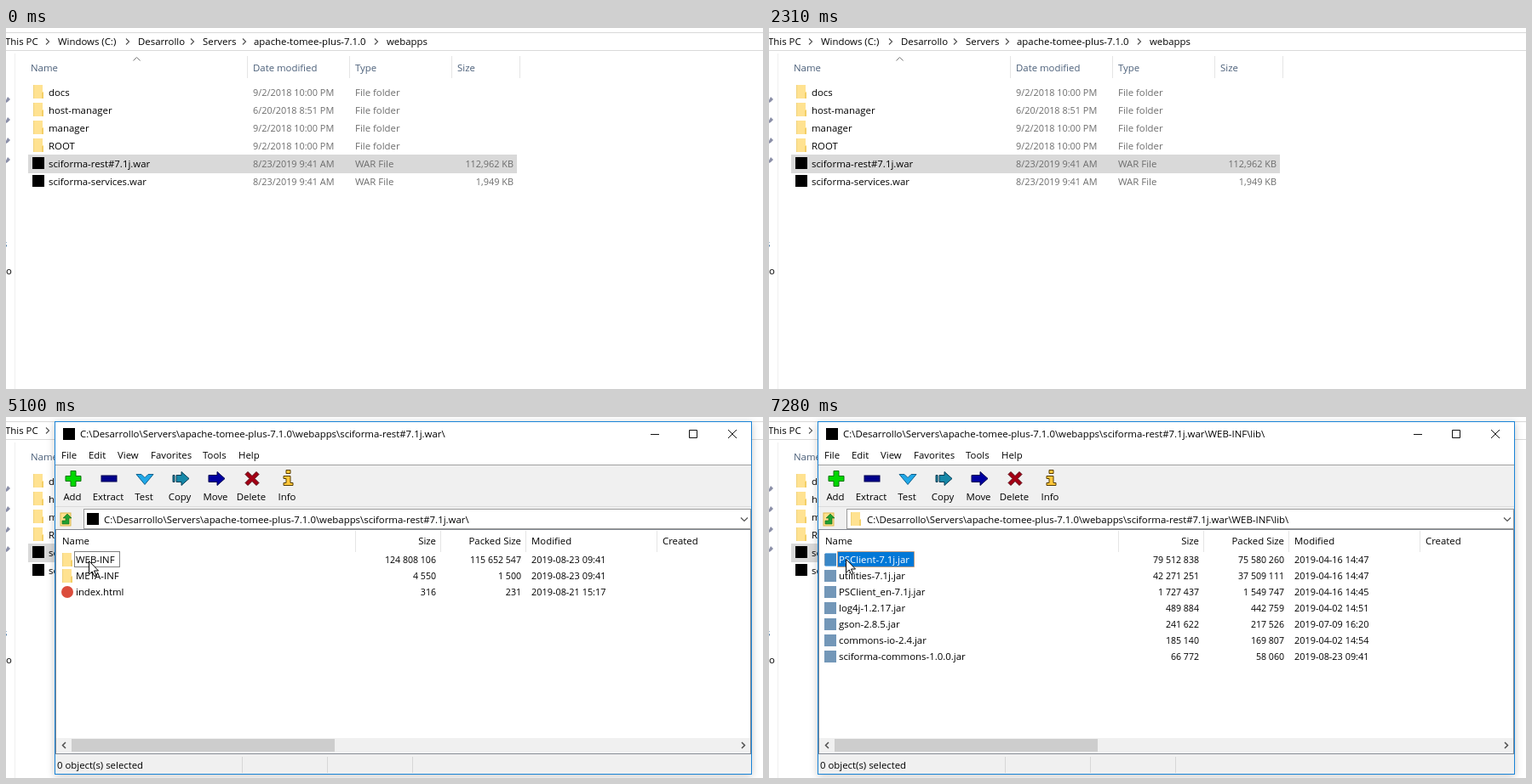
Recreate the animation shown at these times as an HTML page. Size 889 px wide and 425 px high, loop 7990 ms.

```html
<!DOCTYPE html>
<html lang="en">
<head>
<meta charset="utf-8">
<title>Browsing an archive</title>
<style>
  html, body { margin: 0; width: 100%; height: 100%; overflow: hidden; background: #fff; }
  svg { display: block; width: 889px; height: 425px; font: 11.4px "Open Sans", "Noto Sans", sans-serif; }
  text { white-space: pre; }
  .num { font-size: 10.9px; }
  .size { font-size: 10.6px; }
  #panel { filter: drop-shadow(0 2px 5px rgba(0, 0, 0, .22)); }
</style>
</head>
<body>
<svg id="stage" viewBox="0 0 889 425"></svg>
<script>
const LOOP = 7990;
const BLUE = '#0078d7';

// Drawing helpers, all returning SVG markup
const text = (x, y, s, fill = '#000', extra = '') => `<text x="${x}" y="${y}" fill="${fill}" ${extra}>${s}</text>`;
const right = (x, y, s, fill, cls = 'size') => text(x, y, s, fill, `text-anchor="end" class="${cls}"`);
const rect = (x, y, w, h, fill, extra = '') => `<rect x="${x}" y="${y}" width="${w}" height="${h}" fill="${fill}" ${extra}/>`;
const path = (d, fill, stroke = 'none', extra = '') => `<path d="${d}" fill="${fill}" stroke="${stroke}" ${extra}/>`;
const line = (d, stroke, width = 1) => path(d, 'none', stroke, `stroke-width="${width}"`);
const at = (x, y, body) => `<g transform="translate(${x} ${y})">${body}</g>`;

// Icons are centred on 0,0
const icons = {
  folder: path('M-6-8H5V0H6V8H-6Z', '#ffe291') + path('M4 1H6V8H4Z', '#f3cf68') + rect(-6, -8, 1, 16, '#f0d27c'),
  archive: rect(-7, -7, 14, 14, '#000'),
  browser: '<circle r="7" fill="#db4c3c"/>',
  xml: rect(-7, -7, 14, 14, '#d5d3a8'),
  jar: rect(-7, -7, 14, 14, '#7397b8'),
  page: path('M-5.5-7.5H2.5L5.5-4.5V7.5H-5.5Z M2.5-7.5V-4.5H5.5', '#fff', '#8a8a8a')
};
const icon = (name, x, y) => at(x, y, icons[name]);

const files = [
  ['docs', '9/2/2018 10:00 PM'], ['host-manager', '6/20/2018 8:51 PM'],
  ['manager', '9/2/2018 10:00 PM'], ['ROOT', '9/2/2018 10:00 PM'],
  ['sciforma-rest#7.1j.war', '8/23/2019 9:41 AM', '112,962 KB'],
  ['sciforma-services.war', '8/23/2019 9:41 AM', '1,949 KB']
];

function explorer() {
  const crumbs = [[-1, 'This PC', 47], [61, 'Windows (C:)', 141], [155, 'Desarrollo', 217],
    [231, 'Servers', 278], [291, 'apache-tomee-plus-7.1.0', 433], [447, 'webapps']];
  const columns = [[29, 'Name', 283], [290, 'Date modified', 403], [410, 'Type', 523], [530, 'Size', 603]];
  return line('M0 5.5H889M0 26.5H889', '#d9d9d9') + line('M10.5 30V425', '#f0f0f0') +
    crumbs.map(([x, s, next]) => text(x, 20, s) +
      (next ? line(`M${next} 12.5l3.5 3.5l-3.5 3.5`, '#555', 1.2) : '')).join('') +
    columns.map(([x, s, edge]) => text(x, 51, s, '#4c607a') + line(`M${edge + .5} 33V59`, '#e5e5e5')).join('') +
    line('M149.5 38.5l4-4l4 4', '#777') +
    [86, 110, 134, 157].map(y => path(`M0 ${y - 1}l2-4l3 3l-3 3l-2 1Z`, '#8b8fa8')).join('') +
    text(-4, 258, 's', '#31699c') + text(0, 290, 'o') +
    rect(26, 149, 574, 22, '#d9d9d9', 'id="selected"') + rect(26, 171, 574, 21, '#e5f3ff', 'id="hover"') +
    files.map(([name, date, size], i) => {
      const y = 76 + 21 * i;
      return icon(size ? 'archive' : 'folder', 38, y - 1) + text(50, y + 4, name) +
        text(290, y + 4, date, '#6d6d6d', 'class="num"') +
        text(410, y + 4, size ? 'WAR File' : 'File folder', '#6d6d6d') + right(596, y + 4, size || '', '#6d6d6d', 'num');
    }).join('');
}

const tools = [
  ['Add', path('M-3-9H3V-3H9V3H3V9H-3V3H-9V-3H-3Z', '#00d800', '#087508')],
  ['Extract', rect(-9, -3.5, 18, 7, '#00008c', 'stroke="#000050"')],
  ['Test', path('M-10-5H-4L0-1L4-5H10L0 7Z', '#20a8e8', '#12618c')],
  ['Copy', path('M-9-4H-7V4H-9ZM-5-4H1V-8L10 0L1 8V4H-5Z', '#1688a8', '#073d55')],
  ['Move', path('M-9-4H1V-8L10 0L1 8V4H-9Z', '#0000a0', '#000050')],
  ['Delete', path('M-8-5L-5-8L0-3L5-8L8-5L3 0L8 5L5 8L0 3L-5 8L-8 5L-3 0Z', '#a50014', '#50000a')],
  ['Info', path('M-2-10H3V-6H-2ZM-5-3H3V5H6V8H-5V5H-2V0H-5Z', '#ffc83c', '#553c00')]
];

function frame() {
  const menus = [[65, 'File'], [97, 'Edit'], [131, 'View'], [170, 'Favorites'], [231, 'Tools'], [273, 'Help']];
  const columns = [[66, 'Name', 410], [617, 'Modified', 764], [771, 'Created']];
  return rect(57.5, 5.5, 818, 415, '#fff', 'stroke="#1883d7"') +
    rect(58, 57, 817, 76, '#f0f0f0') + line('M58 56.5H875', '#a0a0a0') + line('M58 105.5H875', '#dcdcdc') +
    line('M757 20.5H767M802.5 15.5h9v9h-9ZM848 15l10 10m0-10l-10 10', '#111') +
    menus.map(([x, s]) => text(x, 49, s)).join('') +
    tools.map(([s, shape], i) => at(79 + 42 * i, 72.5, shape) +
      text(78 + 42 * i, 98, s, '#000', 'text-anchor="middle"')).join('') +
    rect(64, 113, 12, 15, '#ffe08c', 'stroke="#d9b84f"') +
    path('M66 126V122H70V119H67L72 114L77 119H74V126Z', '#20a030', '#0d6318', 'stroke-width=".6"') +
    rect(91.5, 108.5, 783, 23, '#fff', 'stroke="#9a9a9a"') + line('M863 118.5l4 4l4-4', '#555', 1.2) +
    columns.map(([x, s, edge]) => text(x, 150, s) + (edge ? line(`M${edge + .5} 134V159`, '#e5e5e5') : '')).join('') +
    right(505, 150, 'Size', '#000', '') + right(605, 150, 'Packed Size', '#000', '') +
    line('M510.5 134V159M610.5 134V159', '#e5e5e5') +
    rect(58, 378, 817, 17, '#f0f0f0') + rect(77, 379, 309, 15, '#cdcdcd') +
    line('M70 383l-3.5 3.5l3.5 3.5M864 383l3.5 3.5l-3.5 3.5', '#505050', 1.5) +
    rect(58.5, 132.5, 816, 264, 'none', 'stroke="#828790"') +
    rect(58, 397, 817, 23, '#f0f0f0') +
    line('M277.5 400V419M377.5 400V419M477.5 400V419', '#d7d7d7') + text(60, 414, '0 object(s) selected');
}

const ROOT = 'C:\\Desarrollo\\Servers\\apache-tomee-plus-7.1.0\\webapps\\sciforma-rest#7.1j.war\\';
const rootRows = [
  ['folder', 'WEB-INF', '124 808 106', '115 652 547', '2019-08-23 09:41'],
  ['folder', 'META-INF', '4 550', '1 500', '2019-08-23 09:41'],
  ['browser', 'index.html', '316', '231', '2019-08-21 15:17']
];
const views = [
  { start: 3790, path: ROOT, badge: 'archive', focus: 54, rows: rootRows },
  { start: 5420, path: ROOT, badge: 'archive', focus: 54, selected: true, rows: rootRows },
  { start: 5570, path: ROOT + 'WEB-INF\\', badge: 'folder', focus: 21, selected: true, rows: [
    ['folder', 'lib', '124 494 944', '115 527 270', '2019-08-23 09:41'],
    ['folder', 'classes', '310 496', '124 225', '2019-08-23 09:41'],
    ['xml', 'web.xml', '2 107', '704', '2019-08-21 10:22'],
    ['xml', 'beans.xml', '292', '168', '2019-08-01 08:20'],
    ['xml', 'scan.xml', '193', '115', '2019-08-22 08:17'],
    ['page', 'exclusions.list', '74', '65', '2019-08-22 08:17']
  ] },
  { start: 7130, path: ROOT + 'WEB-INF\\lib\\', badge: 'folder', focus: 91, selected: true, rows: [
    ['jar', 'PSClient-7.1j.jar', '79 512 838', '75 580 260', '2019-04-16 14:47'],
    ['jar', 'utilities-7.1j.jar', '42 271 251', '37 509 111', '2019-04-16 14:47'],
    ['jar', 'PSClient_en-7.1j.jar', '1 727 437', '1 549 747', '2019-04-16 14:45'],
    ['jar', 'log4j-1.2.17.jar', '489 884', '442 759', '2019-04-02 14:51'],
    ['jar', 'gson-2.8.5.jar', '241 622', '217 526', '2019-07-09 16:20'],
    ['jar', 'commons-io-2.4.jar', '185 140', '169 807', '2019-04-02 14:54'],
    ['jar', 'sciforma-commons-1.0.0.jar', '66 772', '58 060', '2019-08-23 09:41']
  ] }
];

const viewMarkup = v => '<g class="view">' +
  icon('archive', 74, 20) + text(87, 24, v.path) + icon(v.badge, 102, 120) + text(115, 125, v.path) +
  rect(80.5, 158.5, v.focus - 1, 18, v.selected ? BLUE : 'none',
    `stroke="${v.selected ? '#ff8728' : '#000'}" stroke-dasharray="1 1"`) +
  v.rows.map(([kind, name, size, packed, date], i) => {
    const y = 168 + 19 * i, active = v.selected && i === 0;
    return icon(kind, 72, y) + (active ? rect(66, y - 8, 13, 16, BLUE, 'opacity=".5"') : '') +
      text(82, y + 4, name, active ? '#fff' : '#000') +
      right(505, y + 4, size) + right(605, y + 4, packed) + text(617, y + 4, date, '#000', 'class="num"');
  }).join('') + '</g>';

const stage = document.getElementById('stage');
stage.innerHTML = explorer() + `<g id="panel">${frame()}${views.map(viewMarkup).join('')}</g>` +
  path('M.5.5V16.5L4.2 13L6.8 18.5L9 17.5L6.5 12H11.5Z', '#fff', '#000', 'id="cursor"');
const [selected, hover, panel, cursor] = ['selected', 'hover', 'panel', 'cursor'].map(id => document.getElementById(id));
const viewNodes = [...document.querySelectorAll('.view')];
const show = (node, visible) => { node.style.display = visible ? '' : 'none'; };

// Cursor strokes: first step, last step, number of steps, from, to
const moves = [
  [380, 530, 3, [716, 390], [128, 255]],
  [760, 1380, 9, [128, 255], [108, 151]],
  [4100, 4180, 2, [482, 414], [426, 354]],
  [4410, 4560, 3, [426, 354], [92, 184]],
  [4870, 5250, 6, [92, 184], [98, 167]],
  [6510, 6580, 2, [98, 167], [95, 172]],
  [6750, 6900, 3, [95, 172], [90, 167]]
];

function cursorAt(t) {
  const move = moves.findLast(m => t >= m[0]);
  if (!move || (t >= 2310 && t < 4100)) return null;
  const [start, end, count, from, to] = move;
  const step = Math.min(count, Math.floor((t - start) / (end - start) * (count - 1) + .05) + 1);
  const eased = 1 - (1 - step / count) ** 2;
  return from.map((a, i) => Math.round(a + (to[i] - a) * eased));
}

function draw(t) {
  const point = cursorAt(t);
  show(cursor, point);
  if (point) cursor.setAttribute('transform', `translate(${point})`);

  const row = point && t < 2310 ? point[1] : 0;
  selected.setAttribute('fill', row >= 149 && row < 171 ? '#cce8ff' : '#d9d9d9');
  show(hover, row >= 171 && row < 192);

  const away = t < 3870 ? 1 : t < 3950 ? .3 : 0;
  show(panel, t >= 3790);
  panel.setAttribute('transform', `translate(${46.7 * away} ${49 * away}) scale(${1 - .055 * away})`);
  panel.setAttribute('opacity', 1 - .1 * away);
  const current = views.findLastIndex(v => t >= v.start);
  viewNodes.forEach((node, i) => show(node, i === current));
}

function tick() {
  draw(performance.now() % LOOP);
  requestAnimationFrame(tick);
}
tick();
</script>
</body>
</html>
```
